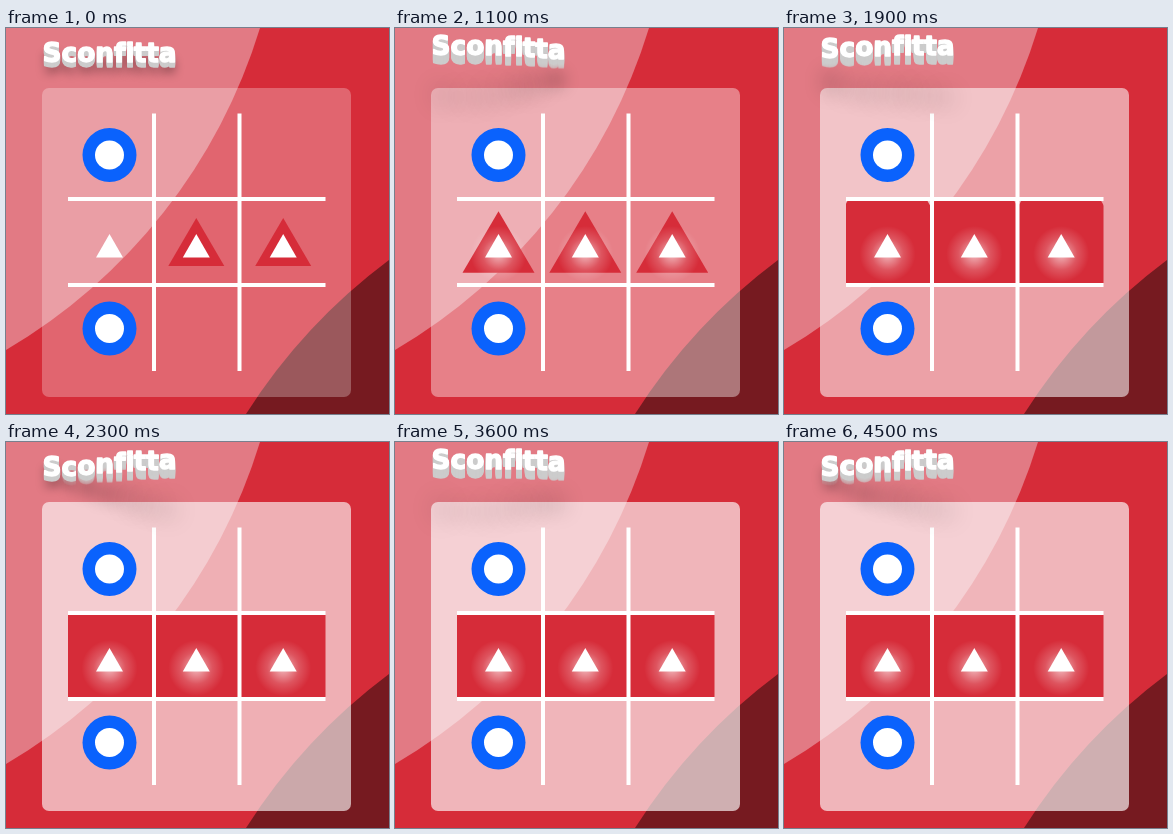
These frames come from a looping animation (383x386 px, 4.6 s). An HTML page with a canvas:

```html
<!DOCTYPE html>
<html lang="it">
<head>
<meta charset="utf-8">
<title>Sconfitta</title>
<style>
html, body { margin: 0; width: 100%; height: 100%; overflow: hidden; background: #d62c39; }
canvas { display: block; }
</style>
</head>
<body>
<canvas id="stage" width="383" height="386"></canvas>
<script>
const ctx = document.getElementById('stage').getContext('2d');
const LOOP = 4600, STEP = 100;
const RED = '#d62c39', WHITE = '#fff';
const COLS = [103.5, 190.3, 277.2], ROW = 214;

const TITLE = 'Sconfitta';
const RISE = 1150, STAGGER = 100, OFFSTAGE = 1000;
const FONT = 'bold 26.4px "DejaVu Sans", sans-serif';

const backdrop = new Path2D('M0 0H254A565.5 565.5 0 0 1 0 322Z');
const corner = new Path2D('M240 386A580 580 0 0 1 383 232V386Z');

// Smooth progress from 0 to 1 between two times
function progress(t, from, to) {
  const u = Math.min(1, Math.max(0, (t - from) / (to - from)));
  return u * u * (3 - 2 * u);
}

// CSS "ease": cubic-bezier(.25, .1, .25, 1)
function ease(x) {
  let lo = 0, hi = 1, s = x;
  for (let i = 0; i < 20; i++) {
    s = (lo + hi) / 2;
    if (0.75 * s * (1 - s) + s ** 3 < x) lo = s; else hi = s;
  }
  return 0.3 * s * (1 - s) ** 2 + 3 * s * s * (1 - s) + s ** 3;
}

function fill(path, color) {
  ctx.fillStyle = color;
  ctx.fill(path);
}

function triangle(x, y, halfWidth, halfHeight, color) {
  const p = new Path2D();
  p.moveTo(x, y - halfHeight);
  p.lineTo(x + halfWidth, y + halfHeight);
  p.lineTo(x - halfWidth, y + halfHeight);
  fill(p, color);
}

function disc(x, y, r, color) {
  const p = new Path2D();
  p.arc(x, y, r, 0, 7);
  fill(p, color);
}

function drawBoard(t) {
  const panel = new Path2D();
  panel.roundRect(36, 60, 309, 309, 7);
  fill(panel, `rgba(255,255,255,${0.27 + 0.38 * progress(t, 0, 2800)})`);

  for (const y of [127, 300.5]) {
    disc(COLS[0], y, 27, '#0a62fd');
    disc(COLS[0], y, 14.5, WHITE);
  }
  drawWinners(t);

  ctx.fillStyle = WHITE;
  for (const y of [169, 255]) ctx.fillRect(62, y, 257.5, 4);
  for (const x of [146, 231.5]) ctx.fillRect(x, 85.5, 4, 257.5);
}

function drawWinners(t) {
  const swell = 3.85 * progress(t, 900, 2100);
  const glow = 0.55 * progress(t, 200, 1100);
  COLS.forEach((x, i) => {
    const size = (i ? 1 : progress(t, 0, 600)) + swell;
    ctx.save();
    ctx.beginPath();
    ctx.rect([62, 148, 233.5][i], 173, 86, 82);
    ctx.clip();
    triangle(x, ROW, 28 * size, 24 * size, RED);
    const light = ctx.createRadialGradient(x, 226, 4, x, 226, 28);
    light.addColorStop(0, `rgba(255,255,255,${glow})`);
    light.addColorStop(0.5, `rgba(255,255,255,${glow * 0.35})`);
    light.addColorStop(1, 'rgba(255,255,255,0)');
    ctx.fillStyle = light;
    ctx.fillRect(x - 30, 196, 60, 60);
    ctx.restore();
    triangle(x, 217.8, 13.5, 11.8, WHITE);
  });
}

// Alternating rise and fall, each letter starting a little later
function lift(t, i) {
  const cycle = Math.max(0, t - i * STAGGER) / RISE % 2;
  return ease(cycle > 1 ? 2 - cycle : cycle);
}

function glyph(char, x, y, color) {
  ctx.fillStyle = ctx.strokeStyle = color;
  ctx.strokeText(char, x, y);
  ctx.fillText(char, x, y);
}

function drawTitle(t) {
  ctx.font = FONT;
  ctx.lineWidth = 1.3;
  ctx.lineJoin = 'round';
  const letters = [...TITLE].map((char, i) => {
    const up = lift(t, i);
    const x = 36.5 + ctx.measureText(TITLE.slice(0, i)).width;
    return { char, up, x, y: 34.5 - 7.5 * up };
  });

  for (const { char, up, x, y } of letters) {
    ctx.save();
    ctx.shadowColor = `rgba(0,0,0,${0.4 - 0.2 * up})`;
    ctx.shadowBlur = 10 + 15 * up;
    ctx.shadowOffsetX = OFFSTAGE;
    ctx.shadowOffsetY = 10 + 40 * up;
    ctx.fillStyle = '#000';
    ctx.fillText(char, x - OFFSTAGE, y);
    ctx.restore();
  }

  for (const { char, up, x, y } of letters) {
    for (let depth = 9; depth > 0; depth--) {
      ctx.globalAlpha = depth > 5 ? up : 1;
      glyph(char, x, y + depth, '#ccc');
    }
    ctx.globalAlpha = 1;
    glyph(char, x, y, WHITE);
  }
}

function draw(now) {
  const t = Math.floor(now % LOOP / STEP) * STEP;
  ctx.fillStyle = RED;
  ctx.fillRect(0, 0, 383, 386);
  fill(backdrop, '#e27a84');
  fill(corner, '#761a20');
  drawBoard(t);
  drawTitle(t);
}

let start;
function tick(now) {
  start ??= now;
  draw(now - start);
  requestAnimationFrame(tick);
}
draw(0);
requestAnimationFrame(tick);
</script>
</body>
</html>
```
